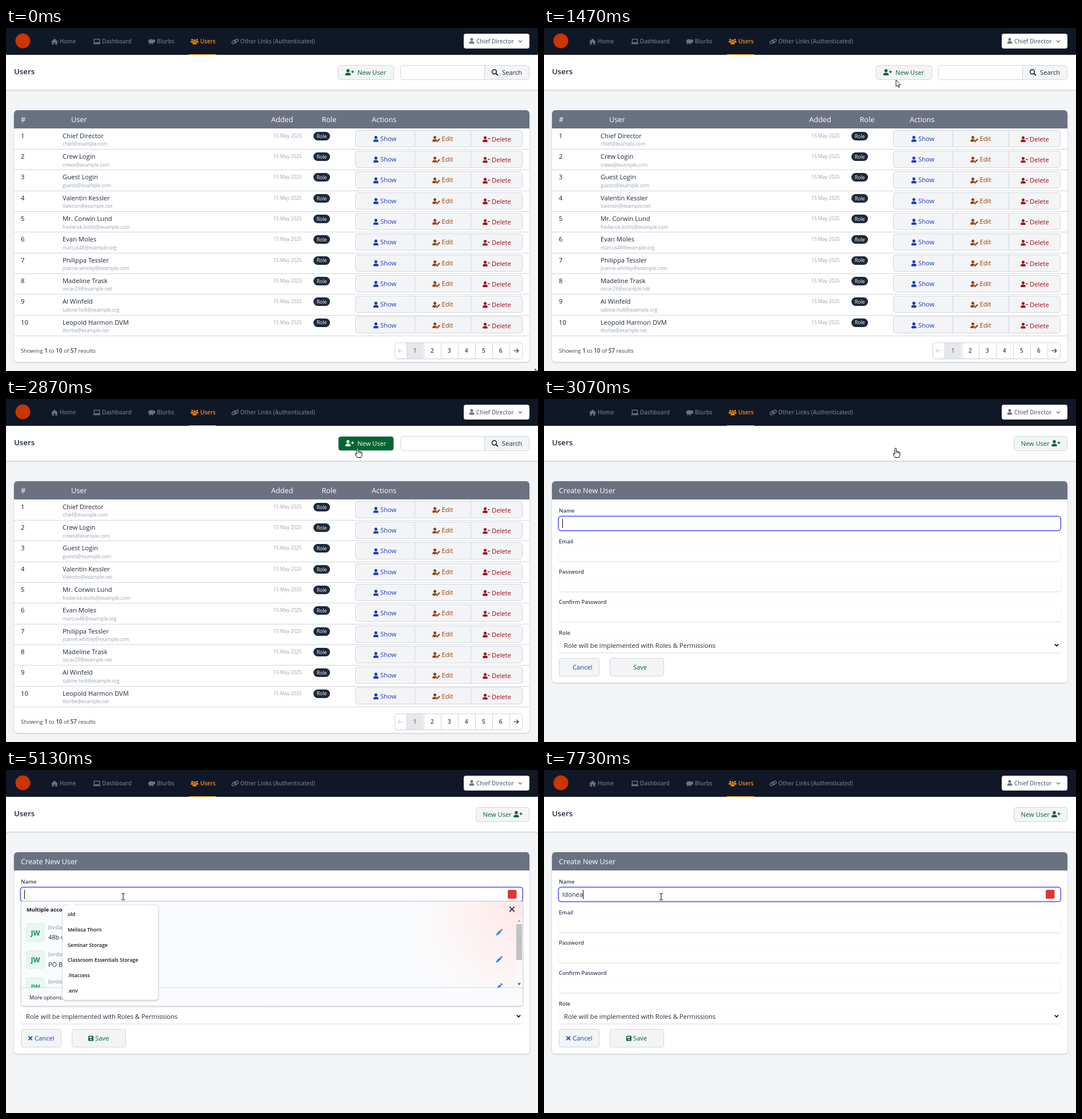
An HTML page with a canvas for the animation above (8000 ms loop, 931 by 601 pixels).

```html
<!DOCTYPE html>
<html lang="en">
<head>
<meta charset="utf-8">
<title>Users</title>
<style>
html, body { margin: 0; width: 931px; height: 601px; overflow: hidden; background: #f3f4f6; }
canvas { display: block; }
</style>
</head>
<body>
<canvas id="stage" width="931" height="601"></canvas>
<script>
const ctx = document.getElementById('stage').getContext('2d');
const LOOP = 8000, FPS = 15;
const BASE = 11.2, SMALL = 9.8, TINY = 8.4, HEAD = 12.7;
const C = {
  nav: '#101828', page: '#f3f4f6', bar: '#6a7282', line: '#d1d5dc', ink: '#1e2939',
  soft: '#364153', pale: '#99a1af', orange: '#ff8904', logo: '#ca3500',
  blue: '#193cb8', brown: '#973c00', red: '#9f0712', green: '#016630'
};
const ADMIN = 'Chief Director', TYPED = 'Idonea';
const ROW = 36.31, TOP = 175.8;
const people = [
  [ADMIN, 'chief@example.com'],
  ['Crew Login', 'crews@example.com'],
  ['Guest Login', 'guests@example.com'],
  ['Valentin Kessler', 'Valentin@example.net'],
  ['Mr. Corwin Lund', 'frederick.bohls@example.com'],
  ['Evan Moles', 'marcus48@example.org'],
  ['Philippa Tessler', 'joanne.whitley@example.com'],
  ['Madeline Trask', 'oscar29@example.net'],
  ['Al Winfeld', 'sabine.holt@example.org'],
  ['Leopold Harmon DVM', 'tkorbe@example.net']
];
const recent = ['old', 'Melissa Thorn', 'Seminar Storage', 'Classroom Essentials Storage', '.htaccess', '.env'];
const accounts = ['48b wellford stree', 'PO Box 719, Marrendale', '7 orchard lane'];

const clamp = v => Math.max(0, Math.min(1, v));
const ease = v => v * v * (3 - 2 * v);
const mix = (a, b, p) => a + (b - a) * p;
const glide = (a, b, p) => [mix(a[0], b[0], p), mix(a[1], b[1], p)];

// ---------- drawing helpers ----------
function text(str, x, y, size, color, weight = 400, align = 'left') {
  ctx.font = `${weight} ${size}px "Open Sans", "Noto Sans", sans-serif`;
  ctx.textAlign = align;
  ctx.fillStyle = color;
  ctx.fillText(str, x, Math.round(y));
  return ctx.measureText(str).width;
}
function rect(x, y, w, h, color) {
  ctx.fillStyle = color;
  ctx.fillRect(x, y, w, h);
}
function box(x, y, w, h, r, fill, stroke, shadow) {
  ctx.save();
  ctx.beginPath();
  ctx.roundRect(x, y, w, h, r);
  if (shadow) {
    ctx.shadowColor = `rgba(0,0,0,${shadow})`;
    ctx.shadowBlur = 3;
    ctx.shadowOffsetY = 1;
  }
  ctx.fillStyle = fill;
  ctx.fill();
  ctx.shadowColor = 'transparent';
  if (stroke) { ctx.strokeStyle = stroke; ctx.lineWidth = 1; ctx.stroke(); }
  ctx.restore();
}
function dot(x, y, r, color) {
  ctx.fillStyle = color;
  ctx.beginPath();
  ctx.arc(x, y, r, 0, 7);
  ctx.fill();
}
function poly(points, color, width = 0, close = false) {
  ctx.beginPath();
  for (let i = 0; i < points.length; i += 2) ctx.lineTo(points[i], points[i + 1]);
  if (close) ctx.closePath();
  if (width) {
    ctx.strokeStyle = color;
    ctx.lineWidth = width;
    ctx.stroke();
  } else {
    ctx.fillStyle = color;
    ctx.fill();
  }
}

// ---------- icons ----------
function person(x, y, s, color) {
  dot(x, y - s * .25, s * .25, color);
  ctx.beginPath();
  ctx.roundRect(x - s * .43, y + s * .08, s * .86, s * .42, [s * .32, s * .32, 1, 1]);
  ctx.fill();
}
function personPlus(x, y, color) {
  person(x + 5, y, 11, color);
  rect(x + 10.5, y - 1.5, 5, 1.4, color);
  rect(x + 12.3, y - 3.3, 1.4, 5, color);
}
function personMinus(x, y, color) {
  person(x + 4.5, y, 10, color);
  rect(x + 9, y - 1.5, 4, 1.3, color);
}
function personPen(x, y, color) {
  person(x + 4.5, y, 10, color);
  poly([x + 7, y + 6, x + 13.5, y - .5], C.page, 4);
  poly([x + 7.5, y + 5.2, x + 13, y - .2], color, 2.2);
}
function house(x, y, color) {
  poly([x - 6.5, y + .5, x, y - 5.5, x + 6.5, y + .5, x + 4.5, y + .5, x + 4.5, y + 5, x - 4.5, y + 5, x - 4.5, y + .5], color);
  rect(x - 1.3, y + 1.5, 2.6, 3.5, C.nav);
}
function laptop(x, y, color) {
  ctx.strokeStyle = color;
  ctx.lineWidth = 1.4;
  ctx.strokeRect(x - 4.6, y - 4, 9.2, 6.2);
  box(x - 6.5, y + 2.8, 13, 1.9, 1, color);
}
function critter(x, y, color) {
  ctx.fillStyle = color;
  ctx.beginPath();
  ctx.ellipse(x - 1.5, y - .7, 4.7, 3.7, 0, 0, 7);
  ctx.ellipse(x + 3.5, y - 1, 2.7, 3, 0, 0, 7);
  ctx.fill();
  rect(x - 4.5, y, 2.2, 4.5, color);
  rect(x, y, 2.2, 4.5, color);
}
function crowd(x, y, color) {
  person(x - 4.2, y - 1.2, 6.5, color);
  person(x + 4.2, y - 1.2, 6.5, color);
  person(x, y + .7, 9.5, C.nav);
  person(x, y + .7, 8.5, color);
}
function chain(x, y, color) {
  ctx.strokeStyle = color;
  ctx.lineWidth = 1.4;
  for (const d of [-1, 1]) {
    ctx.save();
    ctx.translate(x + d * 2.2, y - d * .9);
    ctx.rotate(-.75);
    ctx.beginPath();
    ctx.roundRect(-3.8, -2.2, 7.6, 4.4, 2.2);
    ctx.stroke();
    ctx.restore();
  }
}
function cross(x, y, r, color, width) {
  poly([x - r, y - r, x + r, y + r], color, width);
  poly([x - r, y + r, x + r, y - r], color, width);
}
function disk(x, y, color) {
  box(x - 4.5, y - 4.5, 9, 9, 1.3, color);
  rect(x - 3, y - 3, 5, 2.4, C.page);
  dot(x, y + 2, 1.3, C.page);
}
function pencil(x, y) {
  const color = '#2f80ed';
  poly([x - 3.5, y + 3.5, x + 2, y - 2], color, 3.6);
  poly([x + 2.8, y - 2.8, x + 4.4, y - 4.4], color, 3.6);
  poly([x - 6, y + 6, x - 5, y + 2.2, x - 2.2, y + 5], color);
}
function arrow(x, y, dir, color) {
  poly([x - 4, y, x + 4, y], color, 1.3);
  poly([x + dir, y - 3.5, x + dir * 4.4, y, x + dir, y + 3.5], color, 1.3);
}

// ---------- page parts ----------
function navBar(loaded) {
  rect(0, 0, 931, 47, C.nav);
  if (loaded) dot(29.5, 22.5, 13, C.logo);
  house(85, 24, C.bar);
  laptop(159, 23.5, C.bar);
  critter(255, 24, C.bar);
  crowd(330, 23.5, C.orange);
  chain(401, 23.5, C.bar);
  const links = [['Home', 94], ['Dashboard', 168], ['Blurbs', 264], ['Users', 340], ['Other Links (Authenticated)', 410]];
  for (const [label, x] of links) text(label, x, 27.4, SMALL, label === 'Users' ? C.orange : C.bar, 600);
  rect(320, 46, 48, 1, '#fe9a00');
  box(801, 10, 115, 26, 4, '#fff');
  person(815, 22.5, 10, C.bar);
  text(ADMIN, 823, 26.8, SMALL, C.bar, 600);
  poly([897, 21.8, 900, 24.8, 903, 21.8], C.bar, 1.3);
}
function titleBar() {
  box(0, 47, 931, 61, 0, '#fff', null, .2);
  text('Users', 14, 81, 13.3, C.ink, 600);
}
function card(bottom) {
  box(14, 144, 902, bottom - 144, 6, '#fff', null, .2);
  box(14, 144, 902, 32, [6, 6, 0, 0], C.bar);
}
function listPage(glow, hoverRow) {
  box(581.5, 65.5, 97, 25, 4.5, C.page, C.line);
  ctx.globalAlpha = glow;
  box(582, 66, 96, 24, 4, C.green);
  ctx.globalAlpha = 1;
  const label = glow > .4 ? '#fff' : C.green;
  personPlus(593.5, 77.5, label);
  text('New User', 615, 82, BASE, label);
  box(690.5, 65.5, 147, 25, [4.5, 0, 0, 4.5], '#fff', C.line);
  box(837.5, 65.5, 78, 25, [0, 4.5, 4.5, 0], C.page, C.line);
  ctx.strokeStyle = C.ink;
  ctx.lineWidth = 1.7;
  ctx.beginPath();
  ctx.arc(854.5, 76.8, 3.9, 0, 7);
  ctx.stroke();
  poly([857.3, 79.6, 861, 83.3], C.ink, 2);
  text('Search', 868, 82, BASE, C.ink);

  card(585);
  const heads = [['#', 26], ['User', 114], ['Added', 464], ['Role', 552.5], ['Actions', 640]];
  for (const [name, x] of heads) text(name, x, 165, HEAD, '#fff');
  people.forEach(([name, mail], i) => {
    const y = TOP + i * ROW, hot = i === hoverRow;
    const main = hot ? '#000' : C.ink, sub = hot ? '#6a7282' : C.pale;
    text(i + 1, 26, y + 17, BASE, '#101828');
    text(name, 99, y + 17, BASE, main);
    text(mail, 99, y + 30.5, TINY, sub);
    text('15 May 2025', 468, y + 16, TINY, sub);
    box(538, Math.round(y + 6), 29, 15, 7.5, C.ink);
    text('Role', 552.5, y + 16.8, 8.6, '#fff', 400, 'center');
    const by = Math.round(y + 3.9) - .5;
    box(611.5, by, 292, 29, 4.5, C.page, C.line);
    rect(715, by, 1, 29, C.line);
    rect(813, by, 1, 29, C.line);
    person(647.3, y + 18.5, 10.5, C.blue);
    text('Show', 655, y + 22, BASE, C.blue);
    personPen(746, y + 18.5, C.brown);
    text('Edit', 762.5, y + 22, BASE, C.brown);
    personMinus(834, y + 19, C.red);
    text('Delete', 850, y + 23, BASE, C.red);
    rect(14, Math.round(y + ROW), 902, 1, C.line);
  });

  let x = 26;
  for (const part of ['Showing ', '*1', ' to ', '*10', ' of ', '*57', ' results']) {
    const strong = part[0] === '*';
    x += text(strong ? part.slice(1) : part, x, 569, SMALL, C.soft, strong ? 600 : 400);
  }
  box(680.5, 551.5, 223, 28, 4, '#fff', C.line, .08);
  rect(701, 552, 29, 27, '#e5e7eb');
  for (let i = 0; i < 7; i++) rect(Math.round(700.7 + i * 30.05), 552, 1, 27, C.line);
  for (let i = 1; i <= 6; i++) text(i, 685.6 + i * 30.05, 569, SMALL, i === 1 ? C.bar : C.soft, 600, 'center');
  arrow(690.5, 565.5, -1, C.line);
  arrow(892.5, 565.5, 1, C.soft);
}
function formPage(loaded, letters, caret) {
  box(822.5, 65.5, 93, 25, 4.5, C.page, C.line);
  text('New User', 834.5, 82, BASE, C.green);
  personPlus(888, 77.5, C.green);
  card(497);
  text('Create New User', 26, 165, HEAD, '#fff');
  ['Name', 'Email', 'Password', 'Confirm Password', 'Role'].forEach((label, i) => {
    const y = 199.3 + i * 53.3;
    text(label, 26, y, 9.5, C.soft, 600);
    if (i) box(26, Math.round(y + 7), 878, 24, 4, '#fff', null, .14);
  });
  ctx.strokeStyle = '#615fff';
  ctx.lineWidth = 1.7;
  ctx.beginPath();
  ctx.roundRect(25.3, 205.4, 879, 25.2, 4.5);
  ctx.stroke();
  if (loaded) box(878, 210, 15.5, 15.5, 2.5, '#d93a36');
  const width = text(TYPED.slice(0, letters), 32, 222.3, BASE, C.ink);
  if (caret) rect(Math.round(32 + width), 210, 1, 16, '#000');

  text('Role will be implemented with Roles & Permissions', 35, 436, BASE, C.ink);
  poly([893.8, 429.5, 897, 432.7, 900.2, 429.5], '#000', 1.7);
  box(26.5, 454.5, 70, 31, 3, C.page, C.line);
  box(115.5, 454.5, 94, 31, 3, C.page, C.line);
  if (loaded) {
    cross(42.5, 470, 3.4, C.blue, 1.7);
    disk(148.5, 470.3, C.green);
  }
  text('Cancel', 50, 474.3, BASE, C.blue);
  text('Save', 156, 474.3, BASE, C.green);
}
function accountPanel(alpha) {
  ctx.save();
  ctx.globalAlpha = alpha;
  box(26.5, 230.5, 878, 183, [0, 0, 3, 3], '#fafbfd', '#d5d8de', .25);
  const tint = ctx.createRadialGradient(895, 245, 10, 895, 262, 185);
  tint.addColorStop(0, 'rgba(255,226,224,.7)');
  tint.addColorStop(.5, 'rgba(255,234,232,.45)');
  tint.addColorStop(1, 'rgba(255,240,240,0)');
  rect(700, 231, 204, 150, tint);
  text('Multiple accounts', 36, 247.5, 9.4, '#111827', 700);
  cross(885.5, 244, 4.3, '#253047', 1.8);
  ctx.save();
  ctx.beginPath();
  ctx.rect(27, 260, 877, 122);
  ctx.clip();
  accounts.forEach((place, i) => {
    const y = 269 + i * 47.5;
    box(36, y, 31, 31, 3, '#e8f7f1', '#d9eee5');
    text('JW', 51.5, y + 20.5, 12.5, '#178f63', 700, 'center');
    text('Jordan Worth', 74, y + 9.5, 9.75, '#858c99');
    text(place, 74, y + 28, 11, '#23272f');
    pencil(863.5, y + 15);
  });
  rect(893, 260, 11, 122, 'rgba(250,250,250,.6)');
  rect(893, 270, 10, 63, '#c1c1c1');
  poly([895, 266, 898, 262.5, 901, 266], '#a3a3a3');
  poly([895, 373.5, 898, 377, 901, 373.5], '#505050');
  ctx.restore();
  rect(27, 381, 877, 1, '#d5d8de');
  text('More options...', 41, 401.5, 9.1, '#111827');
  ctx.restore();
}
function suggestions(items, w, h) {
  box(99, 236.5, w, h, 5, '#fff', '#e1e3e8', .3);
  poly([109, 237.5, 115, 232, 121, 237.5], '#fff');
  items.forEach((item, i) => text(item, 108, 256.2 + i * 26.7, 8.8, '#15171c', 600));
}

// ---------- pointer ----------
const shapes = {
  arrow() {
    const p = [0, 0, 0, 11.5, 2.6, 9.2, 4.4, 13.2, 6.1, 12.4, 4.4, 8.6, 7.9, 8.4];
    poly(p, '#fff');
    poly(p, '#000', .9, true);
  },
  hand() {
    const p = [-2, 0, -.6, -1, .7, 0, .7, 4.6, 2.5, 4.6, 3.2, 5.6, 4.9, 5.4, 5.6, 6.4, 6.8, 6.6, 7, 11.5, 5.4, 15.5, -1.6, 15.5, -5, 9.5, -4.3, 8.2, -2, 9.5];
    poly(p, '#fff');
    poly(p, '#000', 1, true);
    for (const x of [.9, 3, 5]) poly([x, 5, x, 8.5], '#000', .7);
  },
  beam() {
    rect(-.6, -5.5, 1.2, 11.5, '#222');
    for (const y of [-6, 5]) {
      rect(-3, y, 2.4, 1.1, '#222');
      rect(.6, y, 2.4, 1.1, '#222');
    }
  }
};
const ENTRY = [880, 592], REST = [575, 370], UNDER = [616, 91], BUTTON = [616, 87], FIELD = [205, 222];
function pointer(t) {
  if (t < 70) return ['arrow', [926, 597]];
  if (t < 330) return null;
  if (t < 930) return ['arrow', glide(ENTRY, REST, ease(clamp((t - 280) / 450)))];
  if (t < 1530) return ['arrow', glide(REST, UNDER, ease(clamp((t - 930) / 540)))];
  if (t < 3200) return ['hand', BUTTON];
  const p = glide(BUTTON, FIELD, ease(clamp((t - 3200) / 470)));
  if (p[1] < 205) return ['arrow', p];
  return ['beam', t < 3930 ? [p[0], p[1] - 1] : p];
}

// ---------- timeline ----------
const keys = [6400, 7000, 7200, 7400, 7530, 7730];
function caretOn(t) {
  if (t < 4070) return t < 3670;
  const since = Math.max(4070, ...keys.filter(k => k <= t));
  return Math.floor((t - since) / 530) % 2 === 0;
}
function draw(t) {
  const cur = pointer(t);
  const loaded = t < 3000 || t >= 3270;
  rect(0, 0, 931, 601, C.page);
  titleBar();
  navBar(loaded);
  if (t < 3000) {
    const row = cur && cur[1][1] > TOP ? Math.floor((cur[1][1] - TOP) / ROW) : -1;
    listPage(clamp((t - 1470) / 260), row);
  } else {
    formPage(loaded, keys.filter(k => k <= t).length, caretOn(t));
    if (t >= 4070 && t < 7200) accountPanel(1 - clamp((t - 7000) / 200));
    if (t >= 4070 && t < 6400) suggestions(recent, 167.5, 166.5);
    else if (t >= 6400 && t < 7000) suggestions(['index.html'], 116, 33);
  }
  if (cur) {
    ctx.save();
    ctx.translate(Math.round(cur[1][0]), Math.round(cur[1][1]));
    shapes[cur[0]]();
    ctx.restore();
  }
}
function tick() {
  const step = Math.floor((performance.now() % LOOP) * FPS / 1000 + .06);
  draw(Math.round(step * 100 / FPS) * 10);
  requestAnimationFrame(tick);
}
tick();
</script>
</body>
</html>
```
